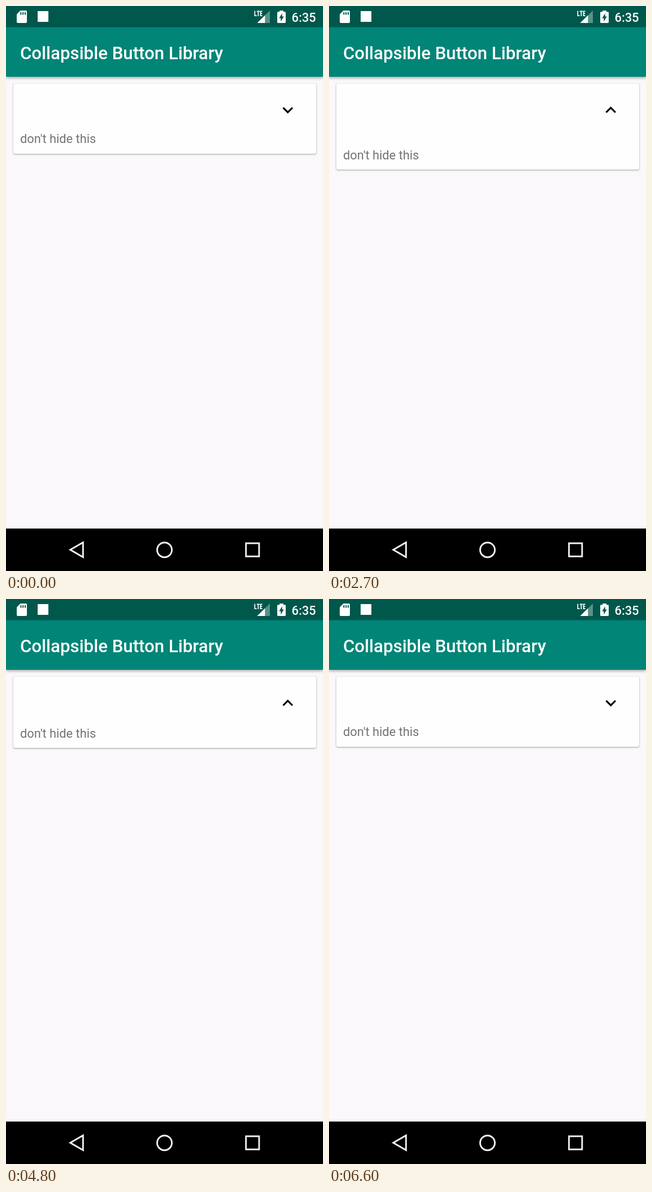
An HTML page that plays this animation: 561 by 998 pixels, repeating every 7 s.

```html
<!DOCTYPE html>
<html lang="en">
<head>
<meta charset="utf-8">
<title>Collapsible card</title>
<style>
  html, body { margin: 0; width: 100%; height: 100%; overflow: hidden; background: #faf8fb; }
  div { position: absolute; }
  svg { position: absolute; left: 0; top: 0; font-family: Roboto, sans-serif; }
  #bar { left: 0; top: 0; width: 561px; height: 124.6px; background: #008577; box-shadow: 0 2px 5px rgba(0, 0, 0, .36); }
  #card { left: 12.5px; top: 137.2px; width: 536px; height: 123.4px; border-radius: 3px; background: #fffeff;
    box-shadow: 0 1px 3px rgba(0, 0, 0, .36), 0 0 1px rgba(0, 0, 0, .15); }
</style>
</head>
<body>
<div id="bar"></div>
<div id="card"></div>
<svg width="561" height="998" viewBox="0 0 561 998">
  <rect width="561" height="37.5" fill="#00574b"/>
  <rect y="923" width="561" height="75"/>

  <g fill="#fff">
    <path d="M25.5 8H35q2 0 2 2V28q0 2-2 2H21q-2 0-2-2V14.5Z"/>
    <path d="M26.4 11v4.4M30.2 11v4.4M34 11v4.4" stroke="#00574b" stroke-width="2"/>
    <rect x="56" y="9" width="19" height="19"/>
    <path d="M467 8V30H444.5Z" opacity=".35"/>
    <path d="M458.3 16.6V30H444.5Z"/>
    <path d="M440.3 8.5V17.2H443.7M443.8 9.3H449M446.4 9V18M453.6 9.3H450.5V17.2H453.6M450.5 13.1H453.2"
      fill="none" stroke="#fff" stroke-width="1.7"/>
    <path d="M484.2 8H490.8V10.2H493.5Q495 10.2 495 11.7V28.5Q495 30 493.5 30H481.5Q480 30 480 28.5V11.7Q480 10.2 481.5 10.2H484.2Z"/>
    <path d="M488.7 13V18.5H491.7L486.3 27.5V21.5H483.3Z" fill="#00574b"/>
    <text x="505.5" y="27.5" font-size="21.8" font-weight="500">6:35</text>
    <text x="25" y="94" font-size="31.2" font-weight="500">Collapsible Button Library</text>
  </g>

  <g font-size="21.8" fill="#737274">
    <text id="hidden" x="25" y="242">hide this</text>
    <text id="kept" x="25" y="242">don't hide this</text>
  </g>
  <path id="arrow" d="M16.59 8.59 12 13.17 7.41 8.59 6 10l6 6 6-6z"/>

  <g fill="none" stroke="#f2f2f2" stroke-width="2.9">
    <path d="M113.8 960.5 136.3 947.6V973.6Z"/>
    <circle cx="280.5" cy="960.7" r="13"/>
    <rect x="424.7" y="949" width="23.2" height="23.2"/>
  </g>
</svg>
<script>
  const LOOP = 7000, STEP = 100, PHASE = 300, ROW = 29.5;
  const taps = [
    { at: 2400, start: 2450, open: true },
    { at: 3655, start: 3655, open: false },
    { at: 4785, start: 4785, open: true },
    { at: 5950, start: 5950, open: false }
  ];
  const [card, hidden, kept, arrow] = ['card', 'hidden', 'kept', 'arrow'].map(id => document.getElementById(id));
  const clamp = x => Math.min(1, Math.max(0, x));
  const decelerate = x => 1 - (1 - x) ** 2;
  const smooth = x => (1 - Math.cos(Math.PI * x)) / 2;

  // Opening grows the card, then fades the row in; closing fades it out, then shrinks.
  function pose(time) {
    const tap = taps.filter(t => t.at <= time).pop();
    if (!tap) return { open: false, grow: 0, alpha: 0 };
    const first = clamp((time - tap.start) / PHASE);
    const second = clamp((time - tap.start - PHASE) / PHASE);
    return tap.open
      ? { open: true, grow: decelerate(first), alpha: smooth(second) }
      : { open: false, grow: 1 - decelerate(second), alpha: 1 - smooth(first) };
  }

  function draw(now) {
    const time = Math.floor(now % LOOP / STEP) * STEP;
    const { open, grow, alpha } = pose(time);
    card.style.height = 123.4 + ROW * grow + 'px';
    kept.setAttribute('y', 242 + ROW * grow);
    hidden.setAttribute('opacity', alpha);
    arrow.setAttribute('transform',
      `translate(498.7 183.8) scale(1.558) rotate(${open ? 180 : 0}) translate(-12 -12)`);
    requestAnimationFrame(draw);
  }
  draw(performance.now());
</script>
</body>
</html>
```
